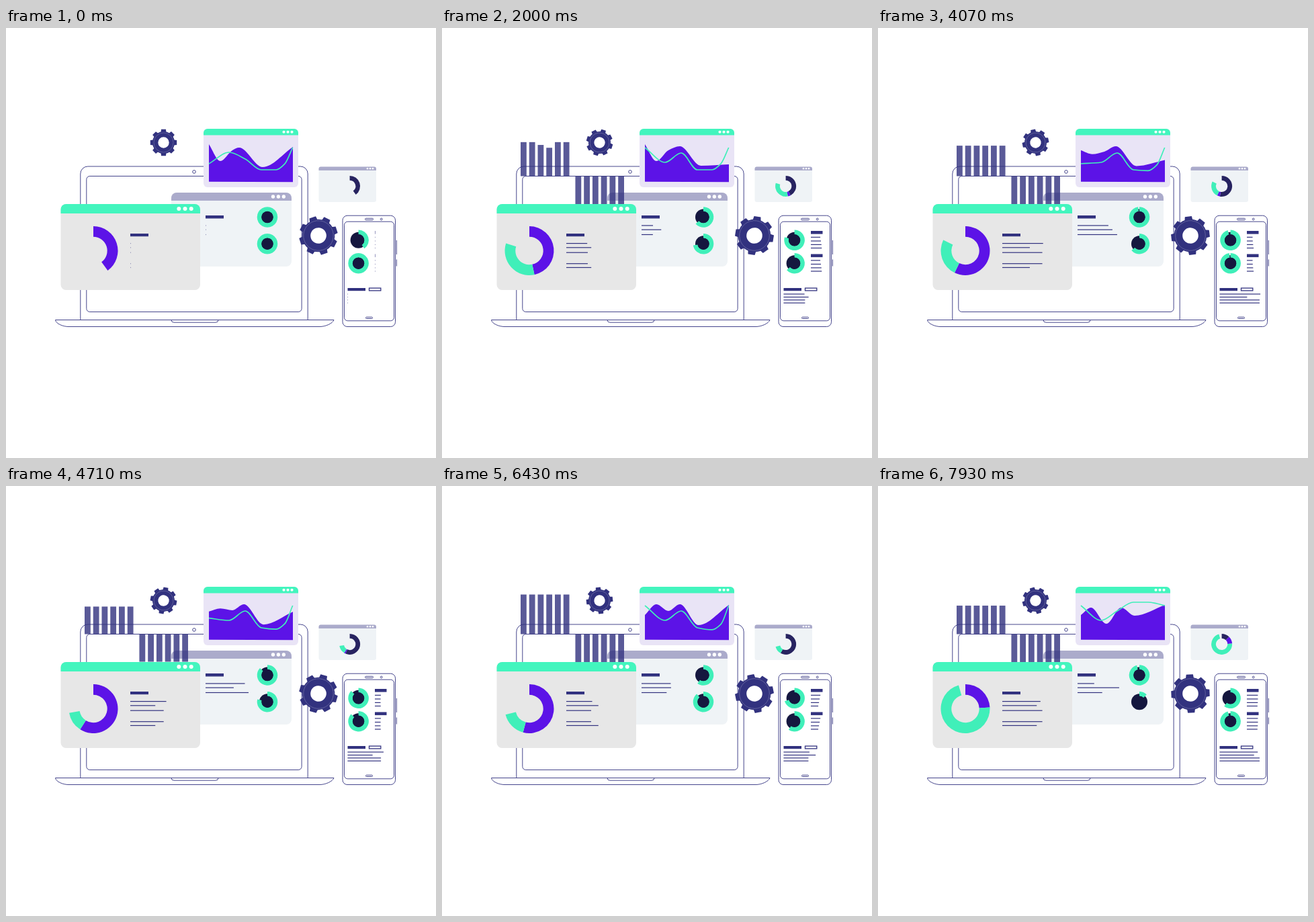
These frames come from a looping animation (640 px wide and 640 px high, 8000 ms). An HTML page:

```html
<!DOCTYPE html>
<html lang="en">
<head>
<meta charset="utf-8">
<title>Dashboard devices</title>
<style>
  html, body { margin: 0; width: 100%; height: 100%; overflow: hidden; background: #fff; }
  svg { display: block; width: 100%; height: 100%; }
</style>
</head>
<body>
<svg id="stage" viewBox="0 0 640 640"></svg>
<script>
const LOOP = 8000;
const INK = '#32327f', DARK = '#15173f', MINT = '#40efb9', HEAD = '#43f5be',
      VIOLET = '#5c13e7', LILAC = '#ababcb', PALE = '#eff3f6';
const stage = document.getElementById('stage');
const updates = [];

// Drawing helpers
function add(tag, attrs, parent = stage) {
  const el = document.createElementNS('http://www.w3.org/2000/svg', tag);
  for (const k in attrs) el.setAttribute(k, attrs[k]);
  parent.appendChild(el);
  return el;
}
const rect = (x, y, width, height, fill, more) => add('rect', { x, y, width, height, fill, ...more });
const disc = (cx, cy, r, fill, more) => add('circle', { cx, cy, r, fill, ...more });
const path = (d, fill, more) => add('path', { d, fill, ...more });
const line = { stroke: INK, 'stroke-width': 0.9 };
const frame = (x, y, w, h, rx) => rect(x, y, w, h, 'none', { rx, ...line });
const set = (el, name, v) => el.setAttribute(name, v);

// Motion helpers
const ramp = (t, a, b) => Math.min(1, Math.max(0, (t - a) / (b - a)));
const wave = (t, peak, period) => Math.cos(2 * Math.PI * (t - peak) / period);

const BEATS = [0, 1140, 2860, 4070, 5430, 6430, 7930];
function track(values) {
  return t => values.reduce((v, next, i) =>
    i ? v + (next - values[i - 1]) * ramp(t, BEATS[i - 1], BEATS[i]) : next, 0);
}

function polar(cx, cy, r, deg) {
  const a = deg * Math.PI / 180;
  return (cx + r * Math.sin(a)).toFixed(2) + ' ' + (cy - r * Math.cos(a)).toFixed(2);
}
function ring(cx, cy, R, r, a, b) {
  if (b - a < 0.1) return '';
  b = Math.min(b, a + 359.99);
  const big = b - a > 180 ? 1 : 0;
  return `M${polar(cx, cy, R, a)}A${R} ${R} 0 ${big} 1 ${polar(cx, cy, R, b)}` +
         `L${polar(cx, cy, r, b)}A${r} ${r} 0 ${big} 0 ${polar(cx, cy, r, a)}Z`;
}

// Smooth curve through [x, y] points that never overshoots them.
function curve(pts) {
  const last = pts.length - 1;
  const d = pts.slice(1).map(([x, y], i) => (y - pts[i][1]) / (x - pts[i][0]));
  const m = pts.map((_, i) => {
    if (i === 0) return d[0];
    if (i === last) return d[last - 1];
    return d[i - 1] * d[i] <= 0 ? 0 : 2 * d[i - 1] * d[i] / (d[i - 1] + d[i]);
  });
  return pts.map(([x, y], i) => {
    if (!i) return `M${x} ${y}`;
    const [px, py] = pts[i - 1], h = (x - px) / 3;
    return `C${px + h} ${py + h * m[i - 1]} ${x - h} ${y - h * m[i]} ${x} ${y}`;
  }).join('');
}

// Parts
function panel(x, y, w, h, r, bar, head, body, dots, gap, dotR) {
  rect(x, y, w, h, body, { rx: r });
  path(`M${x} ${y + bar}V${y + r}a${r} ${r} 0 0 1 ${r} ${-r}H${x + w - r}a${r} ${r} 0 0 1 ${r} ${r}V${y + bar}Z`, head);
  for (let i = 0; i < 3; i++) disc(dots + gap * i, y + bar / 2, dotR, '#fff');
}

function textLines(x, ys, width) {
  ys.forEach((y, i) => {
    const el = rect(x, y - 0.6, 0, 1.2, INK);
    updates.push(t => set(el, 'width', Math.max(0.5, width(i, t))));
  });
}

function gauge(cx, cy, angle) {
  disc(cx, cy, 12, DARK);
  const arc = path('', MINT);
  disc(cx, cy, 8.7, DARK);
  updates.push(t => set(arc, 'd', ring(cx, cy, 15.3, 8.5, 0, angle(t))));
}

// Consecutive slices, each running up to its own end angle.
function donut(cx, cy, R, r, slices) {
  const arcs = slices.map(([fill]) => path('', fill));
  updates.push(t => {
    let from = 0;
    slices.forEach(([, end], i) => {
      const to = Math.max(from, end(t));
      set(arcs[i], 'd', ring(cx, cy, R, r, from, to));
      from = to;
    });
  });
}

function gear(cx, cy, R, body, hole, start, speed) {
  const g = add('g', {});
  for (let a = 0; a < 360; a += 45)
    add('path', {
      d: `M${polar(0, 0, body - 1, a - 15)}L${polar(0, 0, R, a - 10)}L${polar(0, 0, R, a + 10)}L${polar(0, 0, body - 1, a + 15)}Z`,
      fill: INK
    }, g);
  add('circle', { r: (body + hole) / 2, fill: 'none', stroke: INK, 'stroke-width': body - hole }, g);
  add('circle', { r: body - 2, fill: 'none', stroke: '#7777aa', 'stroke-width': 0.6 }, g);
  updates.push(t => set(g, 'transform', `translate(${cx} ${cy}) rotate(${start + speed * t / 1000})`));
}

// Laptop
path('M110.8 434.5V217a11 11 0 0 1 11-11H438.2a11 11 0 0 1 11 11V434.5', 'none', line);
frame(119.8, 220.5, 320.3, 202, 5);
disc(280, 214, 2.3, 'none', line);
path('M73.5 434.5H488C486 440 475 444.5 467 444.5H93C85 444.5 74 440 73.5 434.5Z', '#fff', line);
path('M246 434.5q0 3.7 4 3.7H312q4 0 4-3.7', 'none', line);

// Angles
const violetEnd = track([144, 153, 183, 206, 220, 195, 87]);
const mintEnd = track([144, 215, 360, 296, 220, 256, 344]);
const darkEnd = track([144, 150, 155, 190, 220, 210, 45]);
const gaugeA = track([360, 248, 210, 353, 270, 215, 345]);
const gaugeB = track([360, 195, 328, 230, 345, 320, 45]);
const gaugeC = track([145, 217, 358, 345, 280, 253, 218]);

// Line widths breathe around a middle: [middle, swing, peak time]
const breathe = ([mid, swing, peak], t) => mid + swing * wave(t, peak, 5000);
const LONG = [50, 12, 3700], SHORT = [45, 8, 2400], FULL = [49, 14, 3500];
const NOTES = [LONG, SHORT, FULL, FULL, SHORT];
const noteWidth = (i, t) => ramp(t, 0, 2800) * breathe(NOTES[i], t);

// Back window
const BACK = [[43, 19, 5200], [49, 13, 3000], [47, 17, 4700]];
panel(246, 245, 179, 110, 8, 12, LILAC, PALE, 397.5, 7.9, 2.7);
rect(297, 279, 27, 4.5, INK);
textLines(297, [294, 300.2, 307.5], (i, t) => ramp(t, 1140, 2700) * breathe(BACK[i], t));
gauge(389, 281.5, gaugeA);
gauge(389, 321.2, gaugeB);

// Bars, and the same bars turned half round below the edge
const delays = [0, 0, 900, 1000, 550, 250];
const bars = [0, 180].map(turn => {
  const g = add('g', { opacity: 0.8, transform: `rotate(${turn} 194 220.5)` });
  return delays.map((_, i) => add('rect', { x: 117 + 12.75 * i, width: 8.8, fill: INK }, g));
});
updates.push(t => delays.forEach((delay, i) => {
  const h = ramp(t, delay, delay + 1200) * (50 + 9 * wave(t, 2860, 3600));
  bars.forEach(group => {
    set(group[i], 'y', 220.5 - h);
    set(group[i], 'height', h);
  });
}));

// Front window
panel(81.5, 262, 207.5, 128, 8, 14, HEAD, '#e7e7e7', 257.3, 9.2, 3);
rect(185, 306, 27, 4.2, INK);
textLines(185, [320.6, 326.8, 334.2, 350.7, 356.5], noteWidth);
donut(130, 331.5, 36.5, 20.7, [[VIOLET, violetEnd], [MINT, mintEnd]]);

// Chart window
panel(294, 150, 141, 87, 6, 9.5, HEAD, '#e9e4f6', 413.5, 6, 2.1);
const area = path('', VIOLET);
const trend = path('', 'none', { stroke: MINT, 'stroke-width': 1.7 });
updates.push(t => {
  const open = ramp(t, 0, 2000), flip = ramp(t, 2860, 5430), end = ramp(t, 6430, 7930);
  const sag = ramp(t, 0, 2860) - flip;
  set(area, 'd', curve([
    [302, 173 + 19 * flip],
    [319 - 2 * end, 198 - 22 * flip + 5 * end],
    [337 + 3 * end, 182 + 4 * flip + 19 * end],
    [347 + 7 * open + 8 * end, 178 - 2 * open + 5 * end],
    [382 + 5 * sag, 207 - 3 * sag - 14 * end],
    [427, 177 + 37 * sag]
  ]) + 'V229.3L302 228.7Z');
  set(trend, 'd', curve([
    [302, 190 + 12 * wave(Math.min(t, 6100), 0, 4070)],
    [332, 185 + 15 * open],
    [356, 195 - 9 * open],
    [380, 211 - 38 * end],
    [402, 211 + 3 * flip - 41 * end],
    [415, 202 + 4 * flip - 31 * end],
    [426.7, 178]
  ]));
});

// Small window
panel(465.5, 206.5, 85.5, 52.5, 3, 5.5, LILAC, PALE, 538, 4, 1.3);
donut(511.6, 235.4, 15.5, 8.7, [['#272360', darkEnd], [VIOLET, violetEnd], [MINT, mintEnd]]);

// Phone
frame(501, 279.2, 78.5, 165.3, 7);
frame(503.5, 288.2, 74, 147.6, 5);
frame(534.5, 283.3, 12, 2.4, 1.2);
frame(535.5, 430.3, 10, 2.2, 1);
disc(558.7, 284.5, 1.4, 'none', line);
path('M581.3 316V337M581.3 344.5V354.5', 'none', line);
gauge(524.6, 315.8, gaugeC);
gauge(524.6, 350.2, gaugeA);

for (const y of [302, 336.5]) {
  const title = rect(549, y, 0, 4.6, INK);
  updates.push(t => set(title, 'width', 0.5 + 17 * ramp(t, 0, 1100)));
  textLines(549, [9.4, 15, 20.4, 25.5].map(dy => y + dy), (i, t) =>
    ramp(t, 0, 1100) * (12.5 + 4 * wave(t, 700 + 300 * i, 7000)));
}
rect(508.5, 387, 26.5, 4.2, INK);
rect(540.5, 387.1, 17.3, 3.8, 'none', { stroke: INK, 'stroke-width': 1.3 });
textLines(508.4, [396, 400.5, 404.8, 409.2], noteWidth);

gear(234.5, 170.5, 20, 16.5, 8.2, 0, -36);
gear(465, 309, 29, 24.3, 11.8, -18, 36);

function draw(t) {
  updates.forEach(f => f(t));
}
const start = performance.now();
function tick(now) {
  draw(Math.max(0, now - start) % LOOP);
  requestAnimationFrame(tick);
}
draw(0);
requestAnimationFrame(tick);
</script>
</body>
</html>
```
